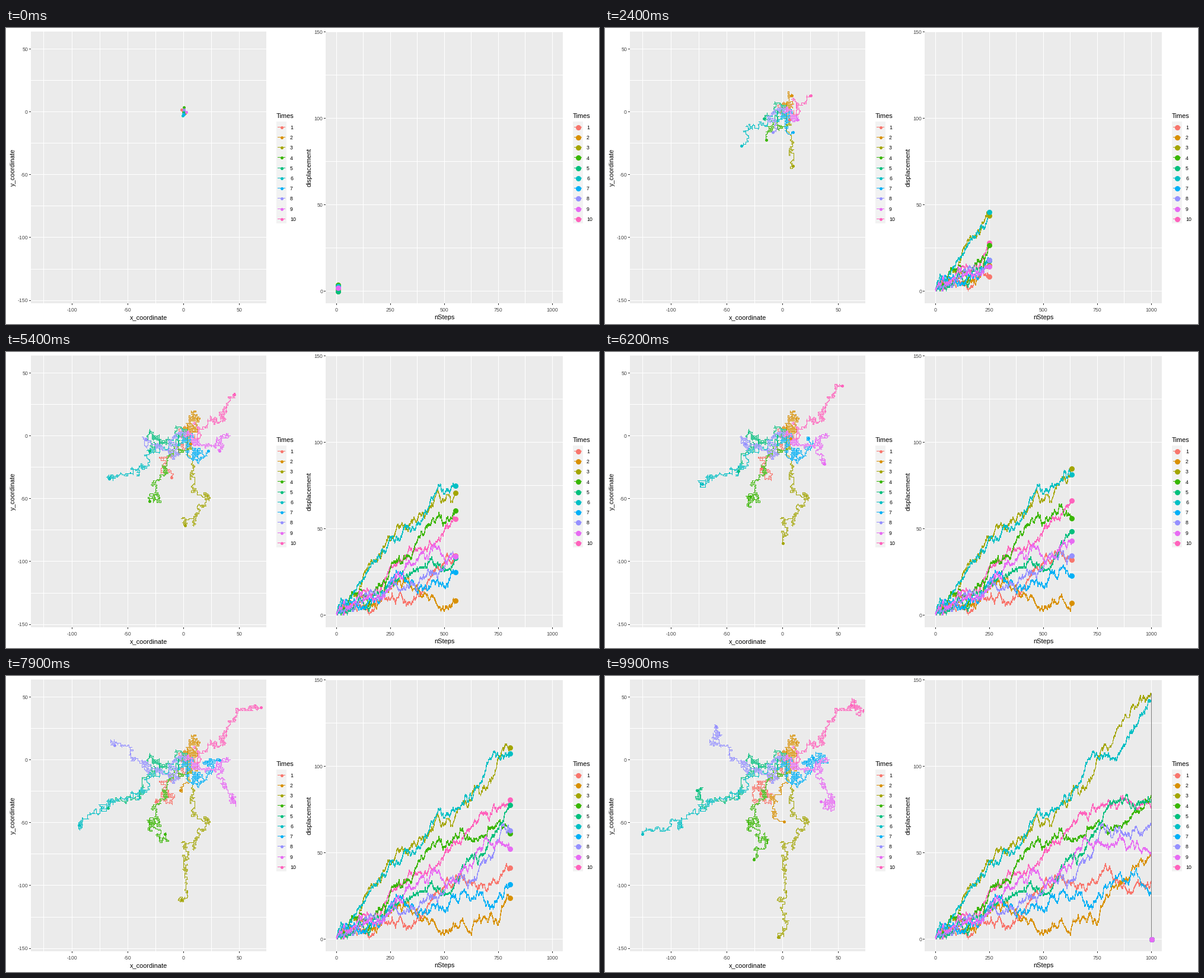
A matplotlib script for the animation above (10000 ms loop, 1000 by 500 pixels).

```python
import numpy as np
import matplotlib.pyplot as plt
from matplotlib.animation import FuncAnimation
from matplotlib.patches import Rectangle

W, H, DPI = 1000, 500, 100
PX = 72 / DPI  # one pixel in points
FRAMES, STEPS = 100, 1000
TOP, BOTTOM = 5.5, 465

plt.rcParams["font.family"] = "Liberation Sans"
plt.rcParams["path.simplify"] = False

COLORS = ["#F8766D", "#D89000", "#A3A500", "#39B600", "#00BF7D",
          "#00BFC4", "#00B0F6", "#9590FF", "#E76BF3", "#FF62BC"]
ORDER = sorted(range(len(COLORS)), key=lambda k: str(k + 1))

# Where each walk stands after one, two and three thirds of its steps.
ROUTES = [
    [(-1, -6), (-10, -30), (-20, -27)],
    [(10, 20), (10, -4), (1, -49)],
    [(20, -45), (4, -84), (-4, -141)],
    [(-16, -30), (-28, -52), (-26, -79)],
    [(-22, -1), (-38, -31), (-77, -24)],
    [(-41, -32), (-80, -43), (-126, -59)],
    [(14, -12), (26, -4), (27, 2)],
    [(-12, -12), (-44, 1), (-60, 27)],
    [(30, -8), (44, -28), (34, -33)],
    [(35, 12), (60, 42), (61, 44)],
]


def bridge(rng, n, dx, dy):
    """n random unit steps that add up to (dx, dy)."""
    m = n - (n + dx + dy) % 2
    diagonals = []
    for d in (dx + dy, dx - dy):
        s = np.ones(m, int)
        s[(m + d) // 2:] = -1
        rng.shuffle(s)
        diagonals.append(s)
    u, v = diagonals
    steps = np.column_stack([(u + v) // 2, (u - v) // 2])
    if m < n:  # parity: rest for one step
        steps = np.insert(steps, rng.integers(m), 0, axis=0)
    return steps


def make_walk(k):
    rng = np.random.default_rng(40 + k)
    stops = [(0, 0)] + ROUTES[k]
    times = [STEPS * j // 3 for j in range(4)]
    parts = [bridge(rng, times[j + 1] - times[j],
                    stops[j + 1][0] - stops[j][0],
                    stops[j + 1][1] - stops[j][1]) for j in range(3)]
    return np.vstack([[(0, 0)], np.cumsum(np.vstack(parts), axis=0)])


fig = plt.figure(figsize=(W / DPI, H / DPI), dpi=DPI, facecolor="white")
ax = fig.add_axes([0, 0, 1, 1])
ax.set_xlim(0, W)
ax.set_ylim(H, 0)
ax.axis("off")


def mid(v):
    """Centre of the pixel that holds v."""
    return np.floor(v) + 0.5


def line(xs, ys, color, **kw):
    return ax.plot(mid(xs), mid(ys), color=color, lw=PX, antialiased=False,
                   snap=False, solid_joinstyle="bevel", **kw)[0]


def dot(x, y, color, size, z):
    return ax.plot([x], [y], "o", color=color, ms=size * PX, mew=0,
                   antialiased=False, zorder=z)[0]


def text(x, y, s, size, color="black", **kw):
    ax.text(x, y, s, fontsize=size * PX, color=color, va="baseline", **kw)


class Panel:
    def __init__(self, left, right, x0, sx, y0, sy):
        self.left, self.right = left, right
        self.x0, self.sx, self.y0, self.sy = x0, sx, y0, sy

    def x(self, v):
        return self.x0 + self.sx * v

    def y(self, v):
        return self.y0 - self.sy * v

    def draw(self, xticks, yticks, xminor, yminor, xlabel, ylabel, ylabel_x, size):
        left, right = self.left, self.right
        ax.add_patch(Rectangle((left, TOP), right - left, BOTTOM - TOP,
                               fc="#EBEBEB", lw=0, zorder=0))
        for v in [*xminor, *xticks]:
            line([self.x(v)] * 2, [TOP, BOTTOM - 1], "white", zorder=1)
        for v in [*yminor, *yticks]:
            line([left, right - 1], [self.y(v)] * 2, "white", zorder=1)
        for v in xticks:
            line([self.x(v)] * 2, [BOTTOM, BOTTOM + 2], "#333333")
            text(self.x(v), 479, str(v), 8.8, "#4D4D4D", ha="center")
        for v in yticks:
            line([left - 3, left - 1], [self.y(v)] * 2, "#333333")
            text(left - 5, self.y(v) + 3.3, str(v), 8.8, "#4D4D4D", ha="right")
        text((left + right) / 2, 492.5, xlabel, 11, ha="center")
        text(ylabel_x, (TOP + BOTTOM) / 2, ylabel, 11,
             ha="center", rotation=90, rotation_mode="anchor")
        self.legend(right + 17, size)

    def legend(self, x, size):
        text(x - 0.5, 152, "Times", 11)
        ax.add_patch(Rectangle((x, 157.5), 17, 172.8, fc="#F2F2F2", lw=0))
        for k, c in enumerate(COLORS):
            y = 167.3 + 17.22 * k
            line([x + 2, x + 14], [y, y], c, zorder=3)
            dot(x + 8.5, mid(y), c, size, 4)
            text(x + 23, y + 3.6, str(k + 1), 8.8)


plane = Panel(42, 439, 299.45, 1.884, 141.5, 2.124)
chart = Panel(539, 939, 557.3, 0.364, 444.7, 2.921)
plane.draw(range(-100, 51, 50), range(-150, 51, 50),
           range(-125, 26, 50), range(-125, 26, 50),
           "x_coordinate", "y_coordinate", 15, 5)
chart.draw(range(0, 1001, 250), range(0, 151, 50),
           range(125, 876, 250), range(25, 126, 50),
           "nSteps", "displacement", 514.5, 9)

step_x = mid(chart.x(np.arange(STEPS + 1)))
tracks = []
for k in ORDER:
    walk, c = make_walk(k), COLORS[k]
    dist = np.hypot(walk[:, 0], walk[:, 1])
    dist[STEPS] = 0  # every displacement falls to zero at the end
    tracks.append((mid(plane.x(walk[:, 0])), mid(plane.y(walk[:, 1])),
                   mid(chart.y(dist)),
                   line([], [], c, zorder=5), dot(0, 0, c, 5, 6),
                   line([], [], c, zorder=5), dot(0, 0, c, 9, 7)))

highest = min(t[2][STEPS - 1] for t in tracks)
drop = line([step_x[-1]] * 2, [highest, chart.y(0)], "#7F7F7F", zorder=6)


def update(i):
    n = min(STEPS, int(6.045 + 999 / 99 * i))
    shown = min(n, STEPS - 1) + 1
    for wx, wy, dy, path, head, curve, tip in tracks:
        path.set_data(wx[:n + 1], wy[:n + 1])
        head.set_data([wx[n]], [wy[n]])
        curve.set_data(step_x[1:shown], dy[1:shown])
        tip.set_data([step_x[n]], [dy[n]])
    drop.set_visible(n == STEPS)
    return []


anim = FuncAnimation(fig, update, frames=FRAMES, interval=100,
                     repeat=True, repeat_delay=0, blit=False)
plt.show()
```
